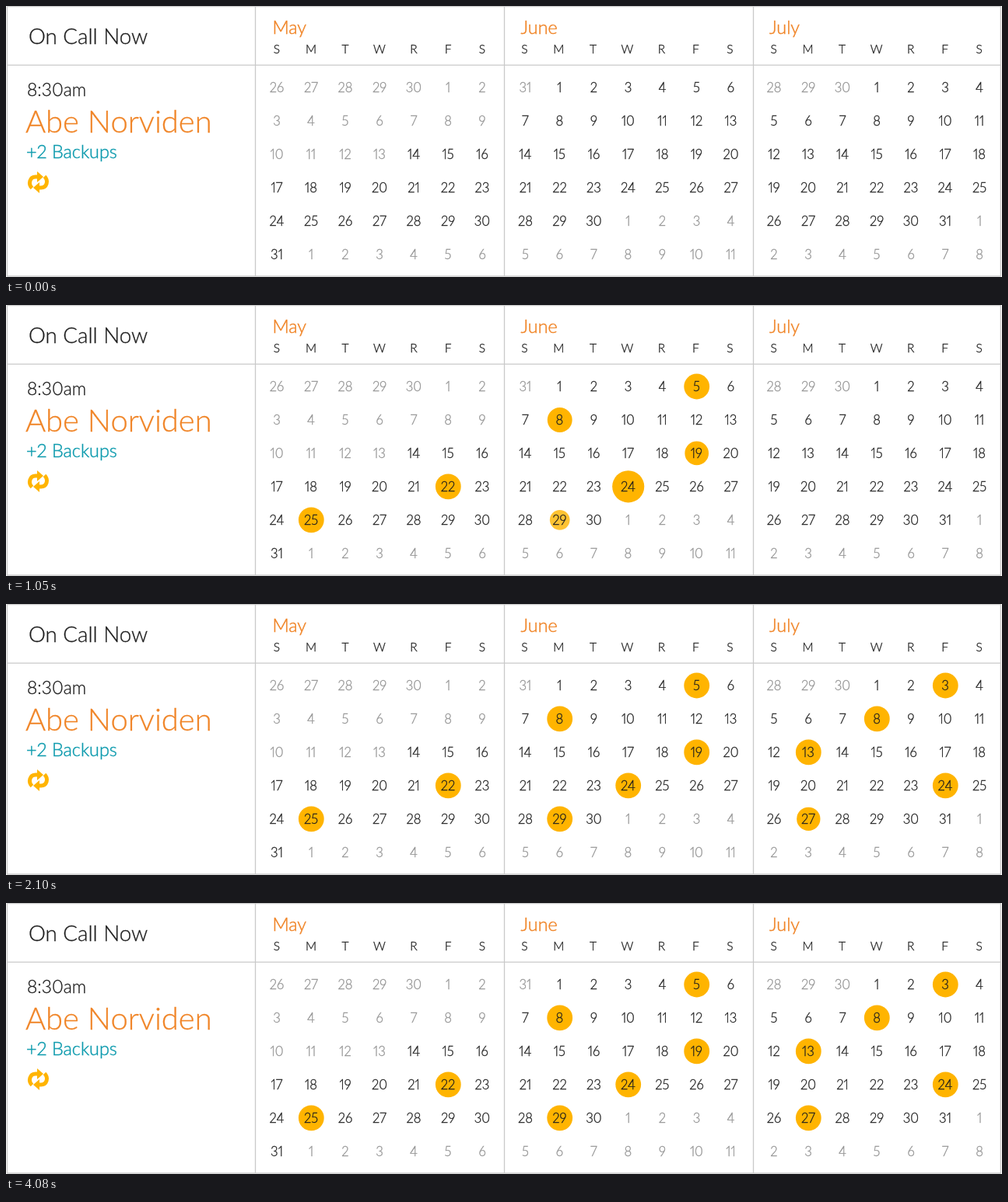
An HTML page for the animation above (4110 ms loop, 1280 by 349 pixels).

```html
<!DOCTYPE html>
<html lang="en">
<head>
<meta charset="utf-8">
<title>On call calendar</title>
<style>
  html, body { margin: 0; width: 100%; height: 100%; overflow: hidden; background: #fff; }
  svg { display: block; width: 1280px; height: 349px; font-family: Lato, "Open Sans", sans-serif; font-weight: 300; }
  /* A hairline stroke gives a weight between light and regular. */
  text { color: #1e1e1e; fill: currentColor; stroke: currentColor; stroke-width: .3px; font-variant-numeric: proportional-nums; }
  .grid { fill: none; stroke: #c9c9c9; stroke-width: 1.3; }
  .mid { text-anchor: middle; }
  .head { font-size: 15.5px; }
  .day { font-size: 16.6px; }
  .day.off { color: #929292; }
  .month { font-size: 23.3px; stroke-width: .5px; }
  .month, .name { color: #f08426; }
  .backup { color: #0c9aad; stroke-width: .45px; }
  .dot { fill: #ffb400; }
</style>
</head>
<body>
<svg viewBox="0 0 1280 349">
  <path class="grid" d="M1.5 .6H1278.3V348H1.5ZM1.5 76.2H1278.3M320.5 .6V348M640.5 .6V348M960.5 .6V348"/>
  <text x="29" y="48.5" font-size="27.7">On Call Now</text>
  <text x="27" y="116" font-size="22.8">8:30am</text>
  <text class="name" x="25" y="162.5" font-size="40">Abe Norviden</text>
  <text class="backup" x="26" y="196" font-size="23.4">+2 Backups</text>
  <defs>
    <g id="arrow">
      <path d="M33.5 234.5C28 229 30.5 220 38 220H41" fill="none" stroke="#ffb400" stroke-width="5"/>
      <path class="dot" d="M40 213L48 220L40 227Z"/>
    </g>
  </defs>
  <use href="#arrow"/>
  <use href="#arrow" transform="rotate(180 41.5 227)"/>
  <g id="dots"></g>
  <g id="labels"></g>
</svg>
<script>
const LOOP = 4110, TICK = 30, FIRST = 150, STAGGER = 140;
const STEP_X = 44, STEP_Y = 42.95, TOP = 105;

const months = [
  { name: 'May', x: 348, headX: 348, titleX: 342.5, lead: 5, prev: 30, days: 31, past: 13, picks: [22, 25] },
  { name: 'June', x: 667.4, headX: 666.4, titleX: 661.5, lead: 1, prev: 31, days: 30, past: 0, picks: [5, 8, 19, 24, 29] },
  { name: 'July', x: 987, headX: 986.6, titleX: 981, lead: 3, prev: 30, days: 31, past: 0, picks: [3, 8, 13, 24, 27] }
];

const dotLayer = document.getElementById('dots');
const labelLayer = document.getElementById('labels');
const dots = [];

function add(parent, tag, attrs, text = '') {
  const el = document.createElementNS('http://www.w3.org/2000/svg', tag);
  for (const key in attrs) el.setAttribute(key, attrs[key]);
  el.textContent = text;
  return parent.appendChild(el);
}

for (const m of months) {
  add(labelLayer, 'text', { class: 'month', x: m.titleX, y: 36 }, m.name);
  [...'SMTWRFS'].forEach((letter, i) =>
    add(labelLayer, 'text', { class: 'head mid', x: m.headX + i * STEP_X, y: 60.5 }, letter));

  for (let i = 0; i < 42; i++) {
    const day = i - m.lead + 1;
    const inside = day > 0 && day <= m.days;
    const label = inside ? day : day < 1 ? m.prev + day : day - m.days;
    const x = m.x + (i % 7) * STEP_X;
    const y = TOP + Math.floor(i / 7) * STEP_Y;
    const off = !inside || day <= m.past ? ' off' : '';
    add(labelLayer, 'text', { class: 'day mid' + off, x, y: y + 5.8 }, label);
    if (inside && m.picks.includes(day)) dots.push(add(dotLayer, 'circle', { class: 'dot', cx: x + .3, cy: y, r: 0 }));
  }
}

const swing = (a, b, k) => a + (b - a) * (1 - Math.cos(Math.PI * k)) / 2;

// Pop past full size, dip below it, then settle.
function radius(p) {
  if (p <= 0) return 0;
  if (p < 175) return 4.5 + 16.3 * Math.sin(p / 175 * Math.PI / 2);
  if (p < 370) return swing(20.8, 15, (p - 175) / 195);
  if (p < 550) return swing(15, 16.4, (p - 370) / 180);
  return 16.4;
}

const start = performance.now();

function draw(now) {
  const t = Math.floor(Math.max(0, now - start) % LOOP / TICK) * TICK;
  dots.forEach((dot, i) => {
    const p = t - FIRST - i * STAGGER;
    dot.setAttribute('r', radius(p));
    dot.setAttribute('opacity', Math.min(1, Math.max(0, p / 75)));
  });
  requestAnimationFrame(draw);
}
draw(start);
</script>
</body>
</html>
```
